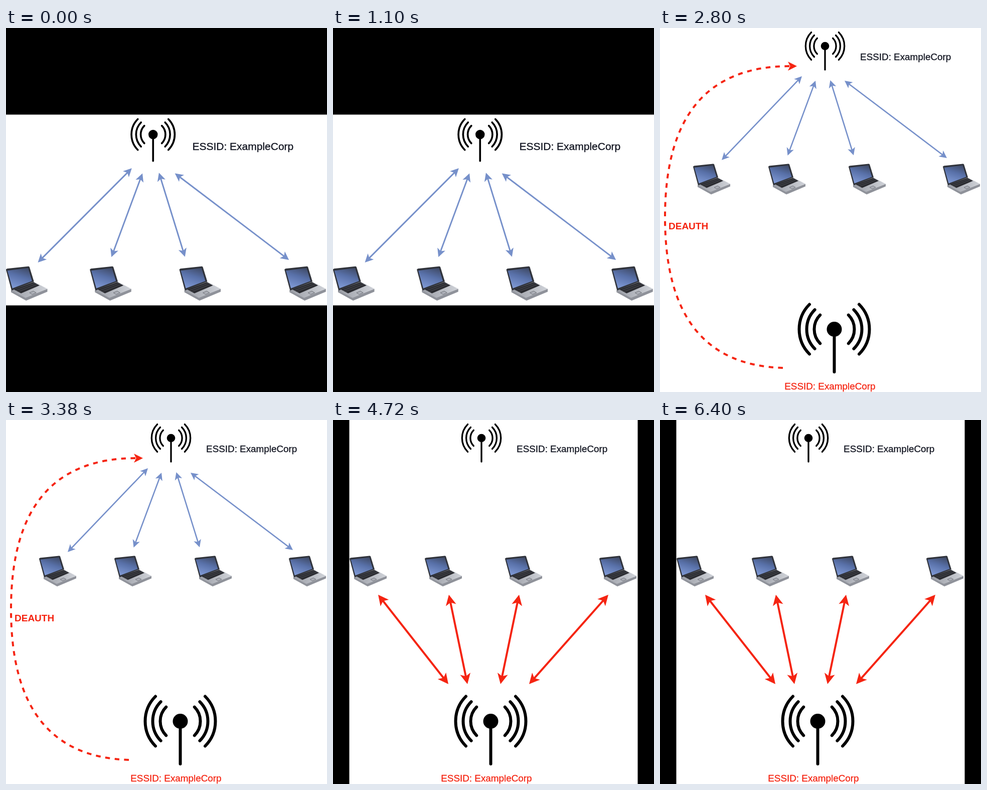
Recreate the animation shown at these times as an HTML page. Size 640 by 725 pixels, loop 7.52 s.

```html
<!DOCTYPE html>
<html lang="en">
<head>
<meta charset="utf-8">
<title>Rogue access point</title>
<style>
  html, body { margin: 0; width: 100%; height: 100%; overflow: hidden; background: #000; }
  svg { display: block; width: 640px; height: 725px; }
  text { font: 18.85px "Liberation Sans", Arial, sans-serif; stroke-width: 0.3; }
  .blue { fill: #7690ca; stroke: #7690ca; stroke-width: 2.6; }
  #red, #deauth, #label { fill: #f52411; stroke: #f52411; }
  #red, #deauth { stroke-width: 4; }
  #deauth text { font-weight: bold; font-size: 19px; stroke: none; }
</style>
</head>
<body>
<svg viewBox="0 0 640 725">
  <defs>
    <linearGradient id="screen" x1="0.8" y1="0" x2="0.4" y2="1">
      <stop offset="0" stop-color="#3f4a66"/>
      <stop offset="0.45" stop-color="#5870a8"/>
      <stop offset="1" stop-color="#7d97d2"/>
    </linearGradient>
    <linearGradient id="deck" x1="0" x2="1">
      <stop offset="0" stop-color="#9a9da5"/>
      <stop offset="1" stop-color="#d0d3d9"/>
    </linearGradient>
    <g id="antenna">
      <circle r="15"/>
      <g fill="none" stroke="#000" stroke-width="6" stroke-linecap="round">
        <path d="M0 0V85"/>
        <g id="waves"></g>
      </g>
    </g>
    <g id="laptop">
      <path fill="#8f929a" d="M9 43L35 56L74 41V46L36 62L9 47Z"/>
      <path fill="url(#deck)" d="M9 44L49 28L74 41L35 57Z"/>
      <path fill="#2b2c31" d="M14 42L49 29L60 35L27 49Z"/>
      <path fill="none" stroke="#5c5e65" stroke-width="0.6" d="M18 44L52 31M22 46L56 33"/>
      <path fill="#aeb1b9" stroke="#65686f" stroke-width="0.8" d="M42 48L49 45L54 48L47 51Z"/>
      <path fill="#30333b" d="M0 7Q0 6 2 5L40 1Q41 1 42 2L50 28L10 44Z"/>
      <path fill="url(#screen)" d="M2.5 8.5L39.5 4L46.5 27L11.5 40Z"/>
    </g>
  </defs>

  <rect id="page" fill="#fff"/>
  <g id="stage">
    <use href="#antenna" transform="translate(329 36) scale(.553)"/>
    <text x="399.1" y="63.6" fill="#111420" stroke="#111420">ESSID: ExampleCorp</text>
    <g id="laptops"></g>
    <g id="blue" class="blue"></g>
    <g id="blueLong" class="blue"></g>
    <g id="blueShort" class="blue"></g>
    <g id="rogue">
      <use href="#antenna" x="347.5" y="600"/>
      <text id="label" x="248.3" y="720.4">ESSID: ExampleCorp</text>
    </g>
    <g id="deauth">
      <path fill="none" stroke-dasharray="9.45" d="M245 677Q10 670 10 377Q10 76 259 76"/>
      <text x="17" y="401">DEAUTH</text>
    </g>
    <g id="red"></g>
  </g>
</svg>
<script>
const byId = id => document.getElementById(id);
const LOOP = 7520;

// Notched arrowhead with its tip at (x, y)
function head(x, y, angle, size) {
  const degrees = angle * 180 / Math.PI;
  return `<path stroke="none" transform="translate(${x} ${y}) rotate(${degrees})"
    d="M0 0L${-size} ${-size / 2}L${-size * .75} 0L${-size} ${size / 2}Z"/>`;
}

function doubleArrow([x1, y1, x2, y2], size) {
  const angle = Math.atan2(y2 - y1, x2 - x1);
  const dx = Math.cos(angle) * size * .7, dy = Math.sin(angle) * size * .7;
  return `<line x1="${x1 + dx}" y1="${y1 + dy}" x2="${x2 - dx}" y2="${y2 - dy}"/>`
    + head(x1, y1, angle + Math.PI, size) + head(x2, y2, angle, size);
}

function drawArrows(id, size, lines) {
  byId(id).innerHTML = lines.map(line => doubleArrow(line, size)).join('');
}

byId('waves').innerHTML = [40, 55, 70].map(r => {
  const c = r * Math.SQRT1_2;
  return `<path d="M${-c} ${-c}A${r} ${r} 0 0 0 ${-c} ${c}M${c} ${-c}A${r} ${r} 0 0 1 ${c} ${c}"/>`;
}).join('');

byId('laptops').innerHTML = [66, 216, 376, 564]
  .map(x => `<use href="#laptop" x="${x}" y="269.5"/>`).join('');

drawArrows('blueLong', 15, [[291, 96, 123, 263.5]]);
drawArrows('blueShort', 15, [[283, 96, 123, 263]]);
drawArrows('blue', 15, [[310, 105, 254.5, 254], [339.5, 104, 386, 253.5], [368, 105, 572, 259]]);
drawArrows('red', 21, [
  [123, 348, 263, 526], [264, 348, 301, 526], [404, 348, 367, 526], [582, 348, 424, 526]
]);
byId('deauth').insertAdjacentHTML('beforeend', head(273, 76, 0, 18));

const views = {
  close: { page: [0, 172.5, 640, 380], transform: 'translate(-73.6 171.8) scale(1.115 1.12)' },
  narrow: { page: [32.5, 0, 575, 725], transform: 'translate(-33 0)' },
  full: { page: [0, 0, 640, 725], transform: '' }
};
const layers = ['blue', 'blueLong', 'blueShort', 'rogue', 'deauth', 'red'];
const scenes = [
  { until: 1840, view: 'close', show: ['blue', 'blueLong'] },
  { until: 2800, view: 'narrow', show: ['blue', 'blueShort', 'rogue'] },
  { until: 3760, view: 'full', show: ['blue', 'blueShort', 'rogue', 'deauth'] },
  { until: 4720, view: 'full', show: ['rogue', 'deauth', 'red'] },
  { until: LOOP, view: 'narrow', show: ['rogue', 'red'] }
];

let current;
function render(time) {
  const scene = scenes.find(s => time < s.until);
  if (scene === current) return;
  current = scene;
  const { page, transform } = views[scene.view];
  ['x', 'y', 'width', 'height'].forEach((name, i) => byId('page').setAttribute(name, page[i]));
  byId('stage').setAttribute('transform', transform);
  for (const id of layers) byId(id).style.display = scene.show.includes(id) ? '' : 'none';
}

const start = performance.now();
function tick() {
  render((performance.now() - start) % LOOP);
  requestAnimationFrame(tick);
}
tick();
</script>
</body>
</html>
```
